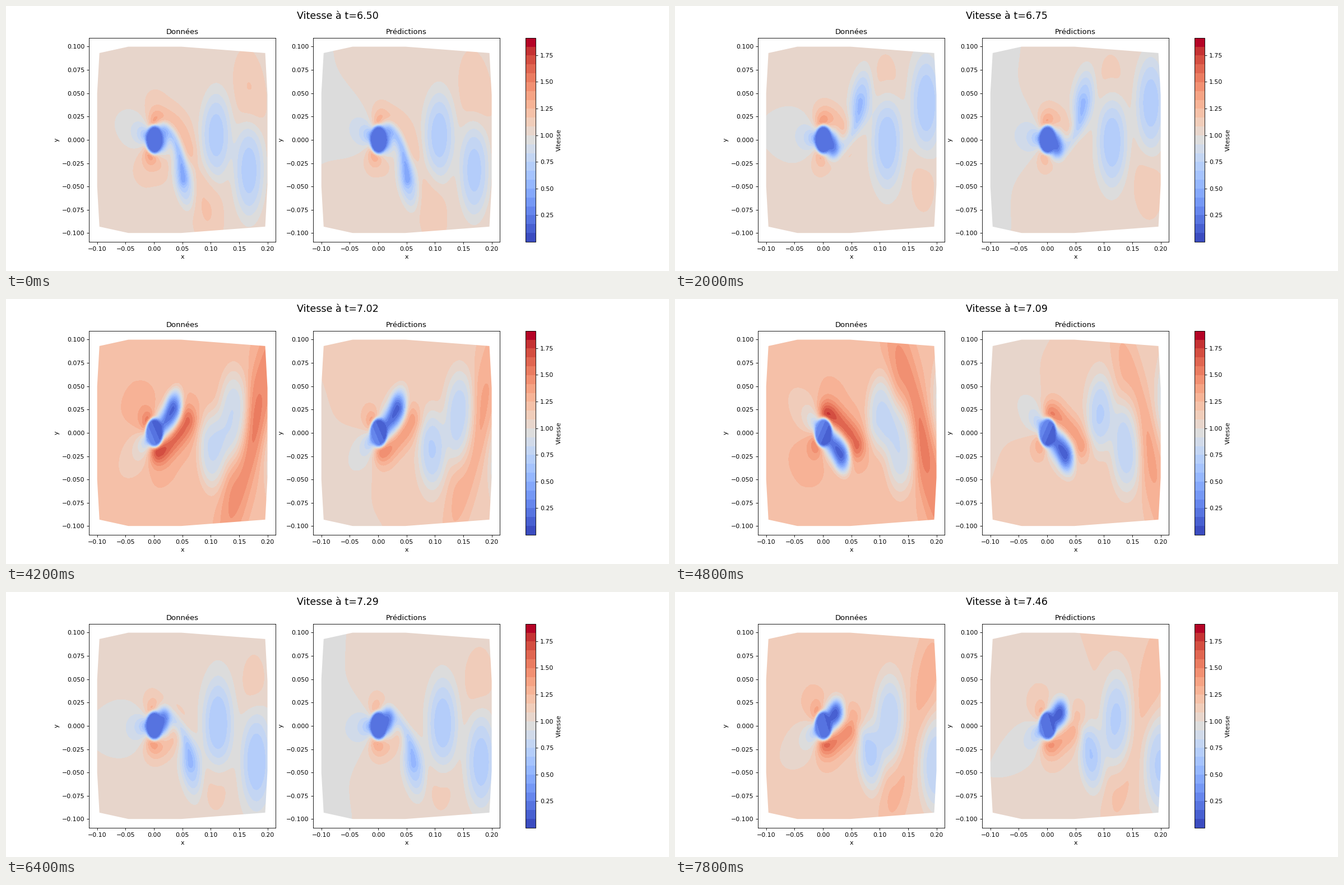
A matplotlib script that plays this animation: 1183 by 473 pixels, repeating every 8 s.

```python
import numpy as np
import matplotlib.pyplot as plt
from matplotlib.animation import FuncAnimation
from matplotlib.patches import Polygon

FRAMES, INTERVAL = 40, 200
T0, DT = 6.504, 0.0245
HALF = 3.15            # half a shedding cycle, in frames
R2 = 0.0135 ** 2       # squared cylinder radius
TILT = 0.7             # peak transverse speed of the stream
VMAX, BANDS = 1.9127, 23
DPI = 1183 / 15

EXTENT = (-0.104, 0.204, -0.104, 0.104)
NX, NY = 168, 180
X, Y = np.meshgrid(
    EXTENT[0] + (np.arange(NX) + 0.5) / NX * (EXTENT[1] - EXTENT[0]),
    EXTENT[2] + (np.arange(NY) + 0.5) / NY * (EXTENT[3] - EXTENT[2]))
RAD = np.hypot(X, Y)


def bump(y, pos, sx, sy, shear):
    """Sheared elliptical spot with a slightly flat top."""
    dy = y - pos[1]
    dx = X - pos[0] - shear * dy
    return np.exp(-(0.5 * ((dx / sx) ** 2 + (dy / sy) ** 2)) ** 1.5)


def ribbon(y, start, ctrl, end, width):
    """Gaussian ridge along a quadratic Bezier curve."""
    d2 = np.full(X.shape, 1.0)
    for t in np.linspace(0, 1, 28):
        px, py = ((1 - t) ** 2 * a + 2 * t * (1 - t) * b + t * t * c
                  for a, b, c in zip(start, ctrl, end))
        d2 = np.minimum(d2, (X - px) ** 2 + (y - py) ** 2)
    return np.exp(-0.5 * d2 / width ** 2)


def inflow(y, tilt, model):
    """Tilted stream past the cylinder, wall layer and inner speed."""
    speed = np.hypot(1.02, tilt)
    angle = np.arctan(tilt)
    if model:
        stream = 1.01 + 0.4 * (speed - 1.02) + 0.25 * X + 0.25 * tilt * y
    else:
        stream = speed + 0.1 * tilt * y
    along = X * np.cos(angle) + y * np.sin(angle)
    across = y * np.cos(angle) - X * np.sin(angle)
    reach = np.exp(-np.maximum(along, 0) / 0.03 - (across / 0.05) ** 2)
    reach *= 1 + 0.9 * (1 - np.exp(np.minimum(along, 0) / 0.05))
    dipole = R2 / (RAD ** 2 + 2e-4) * np.exp(-2j * np.arctan2(across, along))
    flow = stream * np.abs(1 - dipole * reach)
    wall = 1 - np.exp(-(np.maximum(RAD - 0.0125, 0) / 0.0035) ** 2)
    inner = 0.2 - 0.3 * tilt ** 2 * np.clip(along / 0.0135, -1, 0.5)
    return flow, wall, inner


def vortex_pos(age, model):
    """Grows behind the cylinder, then drifts off with the stream."""
    if age < 0:
        s = max(0, 1 + age / HALF)
        return 0.012 + 0.039 * s ** 1.5, -0.042 * s ** 1.2
    path = (0.051, 0.092, 0.122, 0.2) if model else (0.051, 0.1, 0.117, 0.2)
    x = np.interp(age, (0, 1.9, 4.4, 7.6), path) + 0.03 * max(0, age - 7.6)
    return x, -0.022 - 0.02 * np.cos(2 * np.pi * age / 7.5)


def vortex(y, age, pos):
    growth = np.clip(1 + age / HALF, 0, 1)
    depth = 0.33 + 0.22 * np.sin(np.pi * growth)
    sx = np.interp(age, (-2, 0, 3), (0.008, 0.012, 0.019))
    sy = np.interp(age, (-2, 0, 4), (0.009, 0.021, 0.036))
    shear = -0.25 * np.clip(1 - age / 2, 0, 1)
    return depth * bump(y, pos, sx, sy, shear)


def tail(y, age, pos):
    """Slow sheet that ties a vortex to the cylinder and bends as it leaves."""
    e = np.clip(1 + age / 1.2, 0, 1)
    start = 0.004 + 0.005 * e, 0.012 * e
    ctrl = pos[0] * (0.5 + 0.32 * e), 0.5 * pos[1] * (1 - e) + 0.013 * e
    depth = 0.8 * np.exp(-((age + 1.5) / 1.8) ** 2)
    return depth * ribbon(y, start, ctrl, pos, 0.0095 - 0.004 * e)


def crescent(y, age, lean):
    """Fast flow that wraps round the outer edge of the growing wake."""
    start = 0.003 * age, -0.016
    ctrl = 0.008 + 0.011 * age, -0.025 + 0.014 * lean
    end = 0.012 + 0.03 * min(age, 1.5), min(-0.024 + 0.02 * age, 0.012)
    gain = 0.42 * np.exp(-((age - 1.8) / 1.5) ** 2)
    return gain * ribbon(y, start, ctrl, end, 0.012)


def patch(y, age, lean, slope):
    """Fast spot between vortices; spots join into a strip as flow tilts."""
    pos = 0.215 * (1 - 0.575 * np.exp(-age / 3.3)), -0.07 + 0.01 * min(age, 2)
    gain = 0.09 + 0.12 * lean
    return gain * bump(y, pos, 0.018, 0.024 + 0.035 * lean, slope)


def field(n, model):
    half = int(n // HALF)
    tau = n - HALF * half
    side = (-1) ** half
    tilt = TILT * np.sin(np.pi * (tau - 0.42) / HALF)
    lean = (tilt / TILT) ** 2
    flow, wall, inner = inflow(side * Y, tilt, model)
    gain = 0.75 if model else 1
    keep = 1
    for k in range(-1, 3):
        age = tau + HALF * k
        flip = (-1) ** k
        y = side * flip * Y
        pos = vortex_pos(age, model)
        keep = keep * (1 - vortex(y, age, pos))
        if k < 1:
            keep = keep * (1 - tail(y, age, pos))
        if k in (0, 1):
            flow = flow + gain * crescent(y, age, lean)
            flow = flow + gain * patch(y, age, lean, 0.5 * flip * tilt)
    speed = flow * keep * wall + (1 - wall) * inner
    return np.clip(speed, 0.01, VMAX - 0.01)


corner = [(0.2, 0.048), (0.196, 0.093), (0.048, 0.0998),
          (-0.045, 0.0998), (-0.096, 0.093), (-0.1, 0.05)]
outline = corner + [(x, -y) for x, y in reversed(corner)]

fig, axes = plt.subplots(1, 2, figsize=(15, 5.9975), dpi=DPI)
cmap = plt.get_cmap("coolwarm", BANDS)
images = []
for i, (ax, name) in enumerate(zip(axes, ("Données", "Prédictions"))):
    im = ax.imshow(field(0, i == 1), origin="lower", extent=EXTENT,
                   aspect="auto", cmap=cmap, vmin=0, vmax=VMAX,
                   interpolation="bilinear", interpolation_stage="data")
    im.set_clip_path(Polygon(outline, transform=ax.transData))
    ax.set(title=name, xlabel="x", ylabel="y",
           xlim=(-0.1146, 0.2145), ylim=(-0.1093, 0.1093))
    images.append(im)
fig.colorbar(images[0], ax=list(axes), label="Vitesse",
             ticks=np.arange(0.25, 1.8, 0.25))
title = fig.suptitle("", fontsize=16)


def update(n):
    title.set_text(f"Vitesse à t={T0 + DT * n:.2f}")
    for i, im in enumerate(images):
        im.set_data(field(n, i == 1))
    return [title, *images]


anim = FuncAnimation(fig, update, frames=FRAMES, interval=INTERVAL,
                     repeat=True, repeat_delay=0)
plt.show()
```
